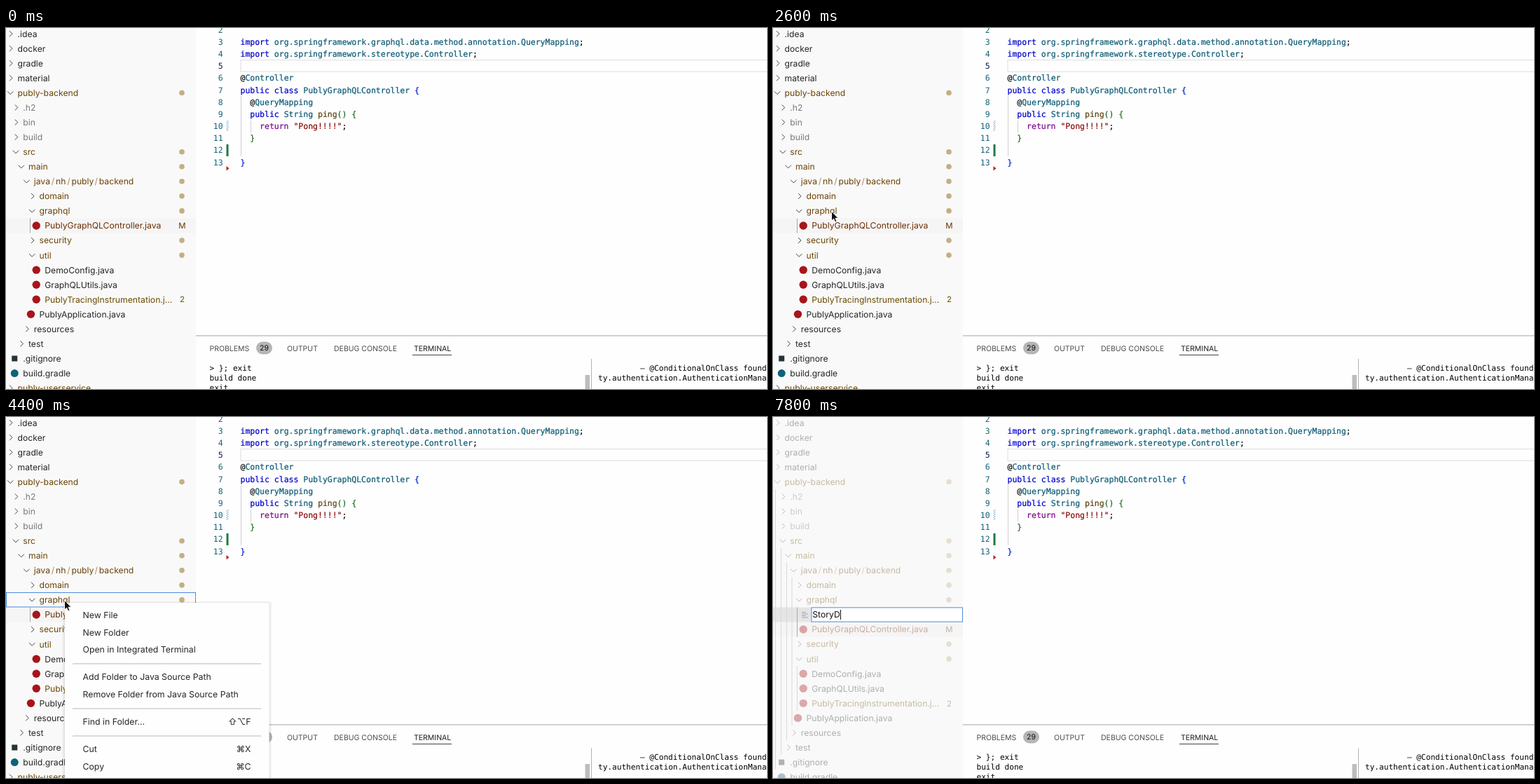
An HTML page for the animation above (8000 ms loop, 1086 by 515 pixels).

```html
<!DOCTYPE html>
<html lang="en">
<head>
<meta charset="utf-8">
<title>Creating a file in the editor</title>
<style>
html, body { margin: 0; width: 100%; height: 100%; overflow: hidden; background: #fefefe; }
svg { display: block; width: 1086px; height: 515px; }
text { white-space: pre; text-rendering: geometricPrecision; }
.ui { font: 12.2px Inter, "DejaVu Sans", sans-serif; }
.menu { font-size: 12.3px; fill: #262626; }
.tab { font-size: 10.5px; fill: #4c4c4c; }
.code { font: 11.47px "DejaVu Sans Mono", monospace; stroke-width: .22; }
.term { font: 11.1px "DejaVu Sans Mono", monospace; fill: #000; }
</style>
</head>
<body>
<svg id="stage" viewBox="0 0 1086 515" xmlns="http://www.w3.org/2000/svg"></svg>
<script>
const LOOP = 8000, STEP = 200;
const ROW = 21.06, LINE = 17.17, CHAR = 6.9;
const BROWN = '#6b4407', DARK = '#262626', PALE = '#7a7a7a';
const stage = document.getElementById('stage');

function add(parent, tag, attrs = {}, text) {
  const el = document.createElementNS('http://www.w3.org/2000/svg', tag);
  for (const key in attrs) el.setAttribute(key, attrs[key]);
  if (text !== undefined) el.textContent = text;
  parent.appendChild(el);
  return el;
}
const group = (parent, attrs) => add(parent, 'g', attrs);
const rect = (parent, x, y, width, height, fill, more) =>
  add(parent, 'rect', { x, y, width, height, fill, ...more });
const label = (parent, x, y, text, more) => add(parent, 'text', { x, y, ...more }, text);
const stroke = (parent, d, color, width = 1) =>
  add(parent, 'path', { d, fill: 'none', stroke: color, 'stroke-width': width });
const show = (el, on) => el.setAttribute('visibility', on ? 'visible' : 'hidden');

// Explorer rows: kind, level, name, colour, badge
const rows = [
  ['closed', 0, '.idea', DARK], ['closed', 0, 'docker', DARK],
  ['closed', 0, 'gradle', DARK], ['closed', 0, 'material', DARK],
  ['open', 0, 'publy-backend', BROWN, 'dot'],
  ['closed', 1, '.h2', PALE], ['closed', 1, 'bin', PALE], ['closed', 1, 'build', PALE],
  ['open', 1, 'src', BROWN, 'dot'], ['open', 2, 'main', BROWN, 'dot'],
  ['open', 3, 'java/nh/publy/backend', BROWN, 'dot'],
  ['closed', 4, 'domain', BROWN, 'dot'], ['open', 4, 'graphql', BROWN, 'dot'],
  ['java', 5, 'PublyGraphQLController.java', '#6a3108', 'M'],
  ['closed', 4, 'security', BROWN, 'dot'], ['open', 4, 'util', BROWN, 'dot'],
  ['java', 5, 'DemoConfig.java', DARK], ['java', 5, 'GraphQLUtils.java', DARK],
  ['java', 5, 'PublyTracingInstrumentation.j...', '#6a4b00', '2'],
  ['java', 4, 'PublyApplication.java', DARK],
  ['closed', 3, 'resources', DARK], ['closed', 2, 'test', DARK],
  ['git', 1, '.gitignore', DARK], ['build', 1, 'build.gradle', DARK],
  ['closed', 0, 'publy-userservice', BROWN],
];
const SPLIT = 13; // rows from here move down for the new file

function drawRow(parent, [kind, level, name, color, badge], index) {
  const y = 8.2 + ROW * index, x = 16.5 + 7.75 * level;
  if (kind === 'closed') stroke(parent, `M${x - 11.5} ${y - 4}l4 4l-4 4`, '#444');
  if (kind === 'open') stroke(parent, `M${x - 14.5} ${y - 2}l4.2 4.2l4.2 -4.2`, '#444');
  if (kind === 'java') add(parent, 'circle', { cx: x - 12, cy: y, r: 5.7, fill: '#a8141b' });
  if (kind === 'git') rect(parent, x - 16, y - 4, 8, 8, '#263238');
  if (kind === 'build') add(parent, 'circle', { cx: x - 12, cy: y, r: 5.5, fill: '#0d6478' });

  const text = label(parent, x, y + 4.4, '', { fill: color });
  name.split('/').forEach((part, i) => {
    if (i) add(text, 'tspan', { dx: 1.8, 'fill-opacity': .6 }, '/');
    add(text, 'tspan', { dx: i ? 1.8 : 0 }, part);
  });
  if (badge === 'dot') add(parent, 'circle', { cx: 251, cy: y, r: 3.8, fill: '#c4ae84' });
  else if (badge) label(parent, 251.5, y + 4.2, badge,
    { fill: color, 'text-anchor': 'middle', 'font-size': 11.4 });
}

function drawExplorer() {
  const side = group(stage, { class: 'ui' });
  rect(side, 0, 0, 271, 515, '#f9f9f9');
  const selected = rect(side, 0, 271.5, 271, 21, '#f6f5f5');
  const inputRow = rect(side, 0, 271.5, 55, 21, '#e5e5e5');
  const guide = stroke(side, 'M34.5 271.5v21', '#a9a9a9');
  const guides = stroke(side,
    'M3.5 103V503M11.5 187V482M19.5 208V461M27 229V440M34.5 355V419', '#d9d9d9');
  const tree = group(side), upper = group(tree), lower = group(tree);
  rows.forEach((row, i) => drawRow(i < SPLIT ? upper : lower, row, i));
  const focus = rect(side, .5, 250.5, 270, 20.5, 'none', { stroke: '#4a8ddc' });

  const input = group(side);
  stroke(input, 'M34.5 271.5v42', '#a9a9a9');
  stroke(input, 'M41 278.5h6M41 281h9M41 283.5h6M41 286h9', '#a5a5a5');
  rect(input, 55, 271.9, 215.5, 20.2, '#fff', { stroke: '#4a8ddc' });
  const typed = label(input, 56.3, 286.2, '', { fill: '#111' });
  const caret = rect(input, 56, 275, 1, 14, '#111');
  return { selected, inputRow, tree, lower, guide, guides, focus, input, typed, caret };
}

const ink = { k: '#0000cc', t: '#0d5c76', n: '#111', f: '#5c4412', s: '#8c0c0c',
  r: '#7d0d88', b: '#0022d0', g: '#1d6d26' };
// Editor lines: number, indent, then colour key and text in turn
const source = [
  [2, 0],
  [3, 0, 'k', 'import ', 't', 'org.springframework.graphql.data.method.annotation.QueryMapping', 'n', ';'],
  [4, 0, 'k', 'import ', 't', 'org.springframework.stereotype.Controller', 'n', ';'],
  [5, 0],
  [6, 0, 'n', '@', 't', 'Controller'],
  [7, 0, 'k', 'public class ', 't', 'PublyGraphQLController ', 'b', '{'],
  [8, 2, 'n', '@', 't', 'QueryMapping'],
  [9, 2, 'k', 'public ', 't', 'String ', 'f', 'ping', 'g', '() {'],
  [10, 4, 'r', 'return ', 's', '"Pong!!!!"', 'n', ';'],
  [11, 2, 'g', '}'],
  [12, 0],
  [13, 0, 'b', '}'],
];

function drawEditor() {
  const editor = group(stage, { class: 'code' });
  rect(editor, 335, 45.7, 760, 16.6, 'none', { stroke: '#e4e4e4', 'stroke-width': 1.3 });
  stroke(editor, 'M335.5 97V183M349.5 132V149', '#cfcfcf');
  for (const [number, indent, ...parts] of source) {
    const y = 23.9 + LINE * (number - 3);
    label(editor, 309.6, y, number,
      { fill: number === 5 ? '#0b1a50' : '#17647a', 'text-anchor': 'end' });
    const text = label(editor, 334.5 + CHAR * indent, y, '');
    for (let i = 0; i < parts.length; i += 2) {
      const color = ink[parts[i]];
      add(text, 'tspan', { fill: color, stroke: color }, parts[i + 1]);
    }
  }
  for (let y = 133; y < 148; y += 3) stroke(editor, `M314.5 ${y + 2}l3 -3`, '#5b9acb', .9);
  rect(editor, 314.5, 166, 3, 17, '#1f7a40');
  add(editor, 'path', { d: 'M314.5 197l4 3.3l-4 3.3z', fill: '#b82222' });
}

function drawPanel() {
  const panel = group(stage, { class: 'ui' });
  stroke(panel, 'M271 439H1086', '#c2c2c2', 1.3);
  [[290.5, 'PROBLEMS'], [401, 'OUTPUT'], [468, 'DEBUG CONSOLE'], [582, 'TERMINAL']]
    .forEach(([x, name], i) =>
      label(panel, x, 460.6, name, { class: 'tab', ...(i === 3 && { style: 'fill:#1c1c1c' }) }));
  rect(panel, 357, 447.5, 23, 18, '#b5b5b5', { rx: 9 });
  label(panel, 368.5, 460.4, '29', { 'text-anchor': 'middle', 'font-size': 10.5, fill: '#111' });
  stroke(panel, 'M580 466.5H636', '#444');
  stroke(panel, 'M835.5 472V515', '#b2b2b2');
  rect(panel, 826.5, 495, 6.5, 20, '#bdbdbd');
  const term = group(stage, { class: 'term' });
  ['> }; exit', 'build done', 'exit'].forEach((text, i) =>
    label(term, 290.5, 488.8 + 14.3 * i, text));
  label(term, 905, 488.8, '– @ConditionalOnClass found');
  label(term, 845, 503.1, 'ty.authentication.AuthenticationManager');
}

function drawMenu() {
  const menu = group(stage, { class: 'ui menu' });
  for (let i = 4; i > 0; i--)
    rect(menu, 84 - i, 265 - i / 2, 291.5 + 2 * i, 270, '#000', { opacity: .025, rx: 2 });
  rect(menu, 84, 265, 291.5, 270, '#fefefe');
  const hover = rect(menu, 85, 271.5, 289.5, 23, '#d3d3d3');
  for (const y of [352, 416, 455]) stroke(menu, `M95 ${y}H364`, '#b8b8b8', 1.2);
  [[283, 'New File'], [307.5, 'New Folder'], [332, 'Open in Integrated Terminal'],
   [371, 'Add Folder to Java Source Path'], [395.5, 'Remove Folder from Java Source Path'],
   [435, 'Find in Folder...', '⇧⌥F'], [474, 'Cut', '⌘X'], [498.5, 'Copy', '⌘C']]
    .forEach(([y, name, keys]) => {
      label(menu, 109.5, y + 4.4, name);
      if (keys) label(menu, 349.5, y + 4.4, keys, { 'text-anchor': 'end' });
    });
  return { menu, hover };
}

function drawPointers() {
  const shape = (d, fill, line) =>
    add(stage, 'path', { d, fill, stroke: line, 'stroke-width': 1, 'stroke-linejoin': 'round' });
  return {
    arrow: shape('M0 0V13.5L3.1 10.7L5.2 15.5L7.5 14.5L5.5 9.8H9.6Z', '#111', '#fff'),
    hand: shape('M-1.5 9.5V1.2C-1.5 -.6 1 -.6 1 1.2V5.5C1.6 4.7 3.4 4.8 3.6 6C4.4 5.2 6 5.5 6.2 6.8' +
      'C7.2 6.2 8.6 6.8 8.6 8.2V11C8.6 13 7.2 13.6 7 16H-.5C-1 13.5 -4 11.5 -4.8 9.6' +
      'C-5.2 8.3 -3.4 7.6 -2.5 8.6Z', '#fff', '#222'),
    beam: shape('M-3 -6.5Q0 -6.5 0 -4.5Q0 -6.5 3 -6.5M0 -4.5V4.5M-3 6.5Q0 6.5 0 4.5Q0 6.5 3 6.5M-1.5 1.5H1.5',
      'none', '#111'),
  };
}

const ui = drawExplorer();
drawEditor();
drawPanel();
Object.assign(ui, drawMenu());
const pointers = drawPointers();

// Pointer stops: time, x, y
const path = [[800, 330, 440], [1400, 147, 340], [1600, 147, 340], [2400, 83.5, 261.5],
  [4400, 83.5, 261.5], [5200, 188.5, 283], [LOOP, 188.5, 283]];
const typing = [[6800, 'S'], [7200, 'St'], [7400, 'Sto'], [7600, 'Story'], [7800, 'StoryD']];
const MENU_OPEN = 3200, CREATE = 6000, POINTER_IN = 1000, POINTER_OUT = 6800;

function pointerAt(t) {
  const i = Math.max(1, path.findIndex(stop => stop[0] >= t));
  const [t0, x0, y0] = path[i - 1], [t1, x1, y1] = path[i];
  const p = Math.max(0, (t - t0) / (t1 - t0)), e = p * p * (3 - 2 * p);
  return [x0 + (x1 - x0) * e, y0 + (y1 - y0) * e];
}

function render(t) {
  const creating = t >= CREATE, menuOpen = t >= MENU_OPEN && !creating;
  const [x, y] = pointerAt(t);
  const hovering = menuOpen && y > 271.5;

  ui.tree.setAttribute('opacity', creating ? .35 : 1);
  ui.lower.setAttribute('transform', `translate(0 ${creating ? ROW : 0})`);
  ui.selected.setAttribute('y', creating ? 292.5 : 271.5);
  show(ui.guide, !creating);
  show(ui.guides, creating);
  show(ui.inputRow, creating);
  show(ui.input, creating);
  show(ui.focus, menuOpen);
  show(ui.menu, menuOpen);
  show(ui.hover, hovering);

  const word = typing.filter(([at]) => t >= at).map(([, text]) => text).pop() || '';
  ui.typed.textContent = word;
  show(ui.caret, creating && word);
  if (word) ui.caret.setAttribute('x', 56.5 + ui.typed.getComputedTextLength());

  const active = t < POINTER_IN || t >= POINTER_OUT ? ''
    : creating ? 'beam' : hovering ? 'hand' : 'arrow';
  for (const name in pointers) {
    show(pointers[name], name === active);
    pointers[name].setAttribute('transform', `translate(${x} ${y})`);
  }
}

const start = performance.now();
function tick() {
  const t = (performance.now() - start) % LOOP;
  render(Math.floor(t / STEP) * STEP);
  requestAnimationFrame(tick);
}
tick();
</script>
</body>
</html>
```
